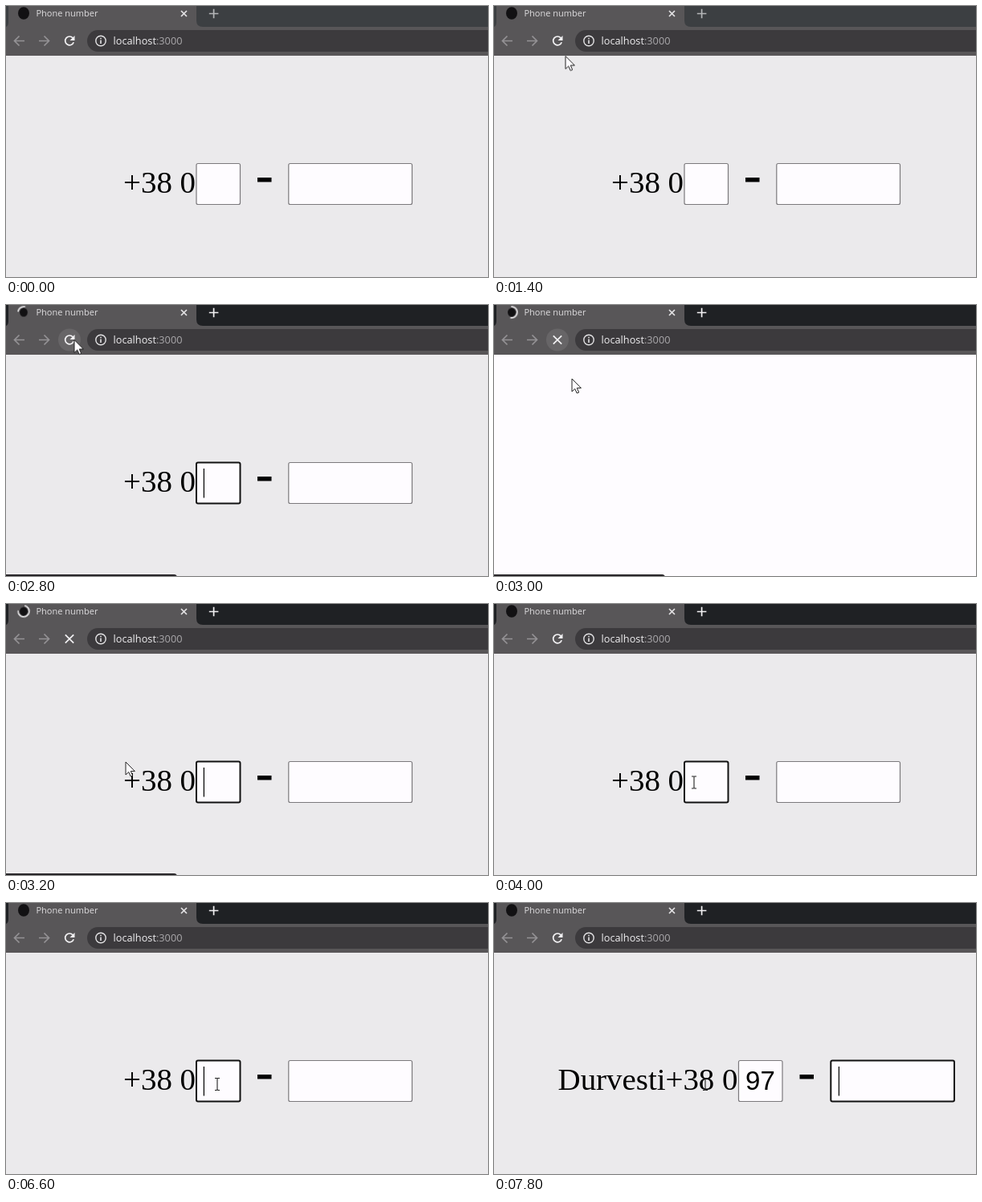
An HTML page that plays this animation: 600 px wide and 338 px high, repeating every 8000 ms.

```html
<!DOCTYPE html>
<html lang="en">
<head>
<meta charset="utf-8">
<title>Phone number</title>
<style>
  html, body { margin: 0; height: 100%; overflow: hidden; background: #ebeaec; }
  svg { display: block; width: 100vw; height: 100vh; }
  .ui { font-family: "Open Sans", "Noto Sans", sans-serif; }
  .label { font: 38.9px "Liberation Serif", "Times New Roman", serif; text-anchor: end; }
  .digits { font: 33px "Liberation Sans", Arial, sans-serif; }
  .line { fill: none; stroke-width: 1.7; }
  .field { fill: #fefcff; stroke: #7b797c; stroke-width: 1.2; }

  /* One 8 s clock; one 200 ms step is 2.5%. */
  [class*="k-"] { animation: 8s step-end infinite; }
  .k-strip { animation-name: strip; }
  .k-plus { animation-name: plus; }
  .k-hover { animation-name: hover; }
  .k-reload { animation-name: reload; }
  .k-stop { animation-name: stop; }
  .k-icon { animation-name: icon; transform-origin: 22px 9.5px; }
  .k-spinner { animation-name: spinner; transform-origin: 22px 9px; }
  .k-status { animation-name: status; }
  .k-blank { animation-name: blank; }
  .k-form { animation-name: form; }
  .k-first { animation-name: first; }
  .k-second { animation-name: second; }
  .k-caret { animation-name: caret; }
  .k-nine { animation-name: nine; }
  .k-done { animation-name: done; }
  .k-undone { animation-name: undone; }
  .k-arrow { animation-name: arrow; }
  .k-beam { animation-name: beam; }

  @keyframes strip { 0% { fill: #3c3f42; } 22.5%, 100% { fill: #1f2124; } }
  @keyframes plus { 0% { stroke: #b4b5b7; } 22.5%, 100% { stroke: #f2f1f3; } }
  @keyframes hover { 0%, 40%, 100% { visibility: hidden; } 22.5% { visibility: visible; } }
  @keyframes reload { 0%, 45%, 100% { visibility: visible; } 37.5% { visibility: hidden; } }
  @keyframes stop { 0%, 45%, 100% { visibility: hidden; } 37.5% { visibility: visible; } }
  @keyframes icon { 0%, 45%, 100% { transform: none; } 35% { transform: scale(.7); } }
  @keyframes spinner {
    0%, 45%, 100% { visibility: hidden; }
    35% { visibility: visible; stroke-dasharray: 28 72; transform: rotate(185deg); }
    37.5% { visibility: visible; stroke-dasharray: 55 45; transform: rotate(-95deg); }
    40% { visibility: visible; stroke-dasharray: 74 26; transform: rotate(-80deg); }
  }
  @keyframes status { 0%, 45%, 100% { visibility: hidden; } 35% { visibility: visible; } }
  @keyframes blank { 0%, 40%, 100% { visibility: hidden; } 37.5% { visibility: visible; } }
  @keyframes form { 0% { transform: none; } 97.5%, 100% { transform: translateX(67.5px); } }
  @keyframes first {
    0%, 97.5%, 100% { stroke: #7b797c; stroke-width: 1.2; }
    22.5% { stroke: #111; stroke-width: 2; }
  }
  @keyframes second {
    0% { stroke: #7b797c; stroke-width: 1.2; }
    97.5%, 100% { stroke: #111; stroke-width: 2; }
  }
  @keyframes caret {
    0%, 30%, 47.5%, 60%, 75%, 87.5%, 97.5%, 100% { visibility: hidden; }
    22.5%, 35%, 55%, 67.5%, 80% { visibility: visible; }
    95% { visibility: visible; transform: translateX(18.4px); }
  }
  @keyframes nine { 0% { visibility: hidden; } 95%, 100% { visibility: visible; } }
  @keyframes done { 0% { visibility: hidden; } 97.5%, 100% { visibility: visible; } }
  @keyframes undone { 0% { visibility: visible; } 97.5%, 100% { visibility: hidden; } }
  @keyframes arrow {
    0% { visibility: hidden; }
    5% { visibility: visible; transform: translate(223px, 215px); }
    7.5% { visibility: visible; transform: translate(188px, 172px); }
    10% { visibility: visible; transform: translate(142px, 116px); }
    12.5% { visibility: visible; transform: translate(108px, 78px); }
    15% { visibility: visible; transform: translate(93px, 66px); }
    17.5% { visibility: visible; transform: translate(89px, 62.5px); }
    20% { visibility: visible; transform: translate(87px, 54px); }
    22.5% { visibility: visible; transform: translate(85px, 45px); }
    25% { visibility: visible; transform: translate(85px, 43.5px); }
    37.5% { visibility: visible; transform: translate(97px, 92px); }
    40% { visibility: visible; transform: translate(149px, 197px); }
    42.5% { visibility: visible; transform: translate(198px, 213px); }
    45%, 100% { visibility: hidden; }
  }
  @keyframes beam {
    0% { visibility: hidden; }
    45% { visibility: visible; transform: translate(242px, 222px); }
    47.5% { visibility: visible; transform: translate(249px, 222.5px); }
    52.5% { visibility: visible; transform: translate(250.5px, 223px); }
    65% { visibility: visible; transform: translate(254px, 224px); }
    67.5% { visibility: visible; transform: translate(258px, 225px); }
    70% { visibility: visible; transform: translate(261px, 226px); }
    80%, 100% { visibility: visible; transform: translate(263px, 226px); }
  }
</style>
</head>
<body>
<svg viewBox="0 0 600 338" preserveAspectRatio="none">
  <rect width="600" height="338" fill="#ebeaec"/>

  <!-- Page -->
  <g class="k-form">
    <text class="label k-undone" x="236" y="233">+38 0</text>
    <text class="label k-done" x="236" y="233">Durvesti+38 0</text>
    <rect class="field k-first" x="237" y="196.5" width="54.5" height="51" rx="2"/>
    <rect class="field k-second" x="351.8" y="196.5" width="153.7" height="51" rx="2"/>
    <rect x="313" y="214" width="17.5" height="5.5"/>
    <g class="digits">
      <text class="k-nine" x="245.5" y="233">9</text>
      <text class="k-done" x="263.9" y="233">7</text>
    </g>
    <rect class="k-caret" x="245.8" y="204" width="1.2" height="36.5"/>
    <rect class="k-done" x="361.3" y="204" width="1.2" height="36.5"/>
  </g>
  <rect class="k-blank" y="62" width="600" height="276" fill="#fefcff"/>
  <path class="k-status" d="M0 336H209Q213 336 213 340H0Z" fill="#29272a"/>

  <!-- Browser frame -->
  <rect class="k-strip" width="600" height="27" fill="#3c3f42"/>
  <path d="M0 26Q3 25 3 20V0H237V18Q237 26 245 26H600V62H0Z" fill="#585658"/>
  <ellipse class="k-icon" cx="22" cy="9" rx="7" ry="7.8" fill="#121113"/>
  <circle class="line k-spinner" cx="22" cy="9" r="7" pathLength="100" stroke="#e9e8ea" stroke-width="2"/>
  <path class="line" d="M218 6l7 7m0-7l-7 7" stroke="#e4e3e5"/>
  <path class="line k-plus" d="M252.8 9.5h11.6m-5.8-5.8v11.6" stroke="#b4b5b7"/>
  <g class="line" stroke="#949295">
    <path d="M23 43.5H10.5m6-6l-6 6 6 6"/>
    <path d="M41 43.5H53.5m-6-6l6 6-6 6"/>
  </g>
  <circle class="k-hover" cx="79" cy="43.5" r="14" fill="#676567"/>
  <g class="k-reload">
    <path class="line" d="M83.3 40A5.4 5.4 0 1 0 84.2 45.2" stroke="#f2f1f3" stroke-width="2"/>
    <path d="M85.5 37V43H79.5Z" fill="#f2f1f3"/>
  </g>
  <path class="line k-stop" d="M73.8 38.3l10.4 10.4m0-10.4l-10.4 10.4" stroke="#f2f1f3"/>
  <rect x="101" y="30" width="540" height="27" rx="13.5" fill="#3c3a3d"/>
  <circle class="line" cx="118" cy="43.5" r="6.2" stroke="#e4e3e5" style="stroke-width:1.4"/>
  <path d="M117.2 42.5h1.6v4.4h-1.6zm0-2.8h1.6v1.6h-1.6z" fill="#e4e3e5"/>
  <g class="ui">
    <text x="37.5" y="13.3" font-size="11" fill="#dfdee0">Phone number</text>
    <text x="133.5" y="48" font-size="12.75" fill="#f0eff1">localhost<tspan fill="#a9a7aa">:3000</tspan></text>
  </g>

  <!-- Pointers -->
  <path class="k-arrow" d="M0 0V16L3.8 12.6 6.2 18 8.7 17 6.3 11.6H11.4Z" fill="#fefcff" stroke="#222" stroke-width="1"/>
  <path class="line k-beam" d="M-3-7.5h2.2L0-6.7.8-7.5H3M0-6.7V6.7M-3 7.5h2.2L0 6.7.8 7.5H3" stroke="#222" style="stroke-width:1.1"/>
</svg>
</body>
</html>
```
